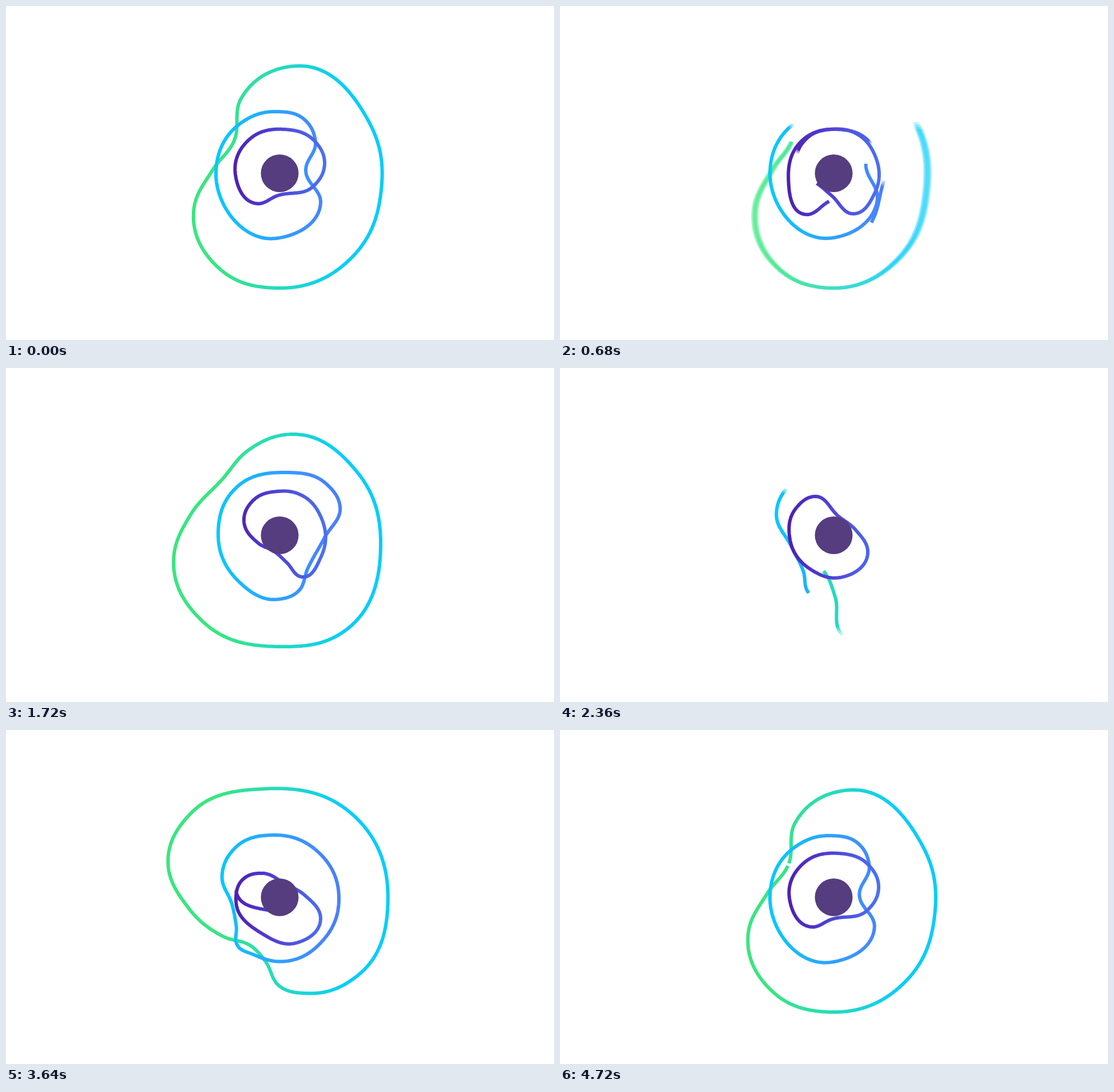
An HTML page with a canvas that plays this animation: 958 px wide and 585 px high, repeating every 4760 ms.

```html
<!DOCTYPE html>
<html lang="en">
<head>
<meta charset="utf-8">
<title>Morphing rings</title>
<style>
html, body { margin: 0; width: 100%; height: 100%; overflow: hidden; background: #fff; }
canvas { display: block; }
</style>
</head>
<body>
<canvas id="stage" width="958" height="585"></canvas>
<script>
const ctx = document.getElementById('stage').getContext('2d');
const LOOP = 4760, STEP = 40, N = 240;
const CX = 478.5, CY = 293;
const EXIT = 1840, GONE = 2090, UNIT = 640;

const clamp = v => Math.max(0, Math.min(1, v));
const mix = (a, b, u) => [a[0] + (b[0] - a[0]) * u, a[1] + (b[1] - a[1]) * u];
const dist = (a, b) => Math.hypot(b[0] - a[0], b[1] - a[1]);

function gradient(x0, x1, ...colors) {
  const g = ctx.createLinearGradient(x0, 0, x1, 0);
  colors.forEach((c, i) => g.addColorStop(i / (colors.length - 1), c));
  return g;
}

// Ring kinds from back to front; each starts drawing at `from` and needs `span`.
const kinds = [
  { name: 'outer', from: 482, span: 722, reach: 90, paint: gradient(370, 590, '#38e67f', '#25dabf', '#06cdfb') },
  { name: 'middle', from: 375, span: 605, reach: 70, paint: gradient(375, 570, '#06c8fd', '#30a2ff', '#4980fc') },
  { name: 'inner', from: 0, span: 520, reach: 50, paint: gradient(400, 557, '#4e20b4', '#5046d6', '#4b70f2') }
];

// A ring is a few nodes from its seam onward. Each pull [node, dx, dy] drags
// the outline around that node, once per UNIT of time; it is at rest at age `key`.
const sets = [
  { start: 3520, key: 1240, swell: 0.07,
    outer: { nodes: [[398, 238], [362, 286], [328, 360], [372, 459], [472, 494], [604, 441],
      [656, 322], [634, 202], [508, 105], [411, 162]], pulls: [] },
    middle: { nodes: [[524, 288], [550, 345], [472, 407], [367, 292], [415, 202], [472, 185],
      [523, 200], [541, 238]], pulls: [[0, 10, -11]] },
    inner: { nodes: [[475, 332], [438, 346], [401, 295], [425, 234], [486, 216], [540, 237],
      [557, 275], [537, 316]], pulls: [[1, -8, 18]] } },
  { start: 240, key: 1480, swell: 0.03,
    outer: { nodes: [[378, 195], [322, 258], [293, 337], [345, 445], [480, 488], [590, 462],
      [655, 310], [612, 180], [500, 116], [425, 143]], pulls: [] },
    middle: { nodes: [[528, 350], [557, 297], [584, 243], [560, 203], [488, 183], [402, 210],
      [371, 285], [405, 372], [477, 405], [510, 392]], pulls: [[0, -10, -18]] },
    inner: { nodes: [[470, 322], [490, 340], [518, 366], [551, 330], [551, 262], [515, 222],
      [476, 216], [432, 232], [416, 268], [440, 306]], pulls: [[0, 13, 7]] } },
  { start: 1805, key: 1195, swell: 0.02,
    outer: { nodes: [[445, 367], [467, 402], [486, 458], [530, 474], [615, 433], [664, 298],
      [600, 145], [452, 103], [325, 147], [287, 228], [320, 300], [390, 342]],
      pulls: [[0, -17, 0], [3, -3, -13], [11, 3, 20]] },
    middle: { nodes: [[420, 386], [414, 350], [400, 310], [378, 255], [400, 207], [467, 184],
      [545, 213], [582, 295], [555, 368], [490, 408], [445, 400]], pulls: [[0, -15, -8]] },
    inner: { nodes: [[488, 265], [520, 287], [544, 328], [498, 370], [445, 356], [402, 300],
      [414, 253], [447, 238]], pulls: [[7, 2, 13], [2, 4, 4], [3, 9, 2]] } }
];

function moveNodes({ nodes, pulls }, reach, k) {
  return nodes.map(p => pulls.reduce(([x, y], [i, dx, dy]) => {
    const w = k * Math.exp(-((dist(p, nodes[i]) / reach) ** 2));
    return [x + dx * w, y + dy * w];
  }, p));
}

const widen = (pts, s) => pts.map(([x, y]) => [CX + (x - CX) * s, y]);

// Unit tangent of the circle through a node and its two neighbours.
function tangent(a, b, c) {
  const l0 = dist(a, b), l1 = dist(b, c);
  const x = (b[0] - a[0]) * l1 / l0 + (c[0] - b[0]) * l0 / l1;
  const y = (b[1] - a[1]) * l1 / l0 + (c[1] - b[1]) * l0 / l1;
  const l = Math.hypot(x, y);
  return [x / l, y / l];
}

// Closed smooth curve through the nodes, as N even steps from the seam.
function curve(nodes) {
  const n = nodes.length, at = i => nodes[(i + n) % n];
  const dirs = nodes.map((p, i) => tangent(at(i - 1), p, at(i + 1)));
  const dense = [nodes[0]], len = [0];
  for (let i = 0; i < n; i++) {
    const a = at(i), d = at(i + 1), t0 = dirs[i], t1 = dirs[(i + 1) % n], h = dist(a, d) * 0.37;
    const b = [a[0] + t0[0] * h, a[1] + t0[1] * h], c = [d[0] - t1[0] * h, d[1] - t1[1] * h];
    for (let j = 1; j <= 20; j++) {
      const u = j / 20, m = mix(b, c, u);
      const p = mix(mix(mix(a, b, u), m, u), mix(m, mix(c, d, u), u), u);
      len.push(len[len.length - 1] + dist(dense[dense.length - 1], p));
      dense.push(p);
    }
  }
  const out = [], total = len[len.length - 1];
  for (let s = 0, k = 1; s <= N; s++) {
    const goal = total * s / N;
    while (k < len.length - 1 && len[k] < goal) k++;
    out.push(mix(dense[k - 1], dense[k], (goal - len[k - 1]) / (len[k] - len[k - 1])));
  }
  return out;
}

function line(pts, from, to) {
  ctx.beginPath();
  for (let k = from; k <= to; k++) ctx.lineTo(pts[k][0], pts[k][1]);
  if (to - from === N) ctx.closePath();
  ctx.stroke();
}

// Visible part of a ring, with a short fade at its moving tip.
function trace(pts, part, alpha) {
  const end = Math.round(part * N);
  if (end < 1) return;
  const tail = part < 0.97 ? Math.min(3, end - 1) : 0;
  ctx.globalAlpha = alpha;
  line(pts, 0, end - tail);
  for (let j = 0; j < tail; j++) {
    ctx.globalAlpha = alpha * (0.75 - j * 0.25);
    line(pts, end - tail + j, end - tail + j + 1);
  }
}

function drawRing(set, kind, age) {
  const erased = clamp((age - EXIT) / (GONE - EXIT));
  const part = Math.min(clamp((age - kind.from) / kind.span), 1 - erased);
  if (part <= 0) return;
  const k = (age - set.key) / UNIT;
  const outer = kind.name === 'outer';
  let nodes = moveNodes(set[kind.name], kind.reach, k);
  if (outer) nodes = widen(nodes, 1 + set.swell * k - 0.5 * erased);
  const pts = curve(nodes);
  ctx.strokeStyle = kind.paint;
  if (outer && erased) {
    // Motion blur while the outer ring snaps inward.
    for (let j = -2; j <= 2; j++) trace(widen(pts, 1 + j * 0.013), part, 0.35);
  } else {
    trace(pts, part, 1);
  }
}

function render(t) {
  ctx.globalAlpha = 1;
  ctx.fillStyle = '#fff';
  ctx.fillRect(0, 0, 958, 585);
  ctx.lineWidth = 6;
  ctx.lineJoin = 'round';
  for (const kind of kinds) {
    for (const set of sets) drawRing(set, kind, (t - set.start + LOOP) % LOOP);
  }
  ctx.globalAlpha = 1;
  ctx.fillStyle = '#553d80';
  ctx.beginPath();
  ctx.arc(CX, CY, 33, 0, Math.PI * 2);
  ctx.fill();
}

const begin = performance.now();
function tick() {
  const t = (performance.now() - begin) % LOOP;
  render(Math.floor(t / STEP) * STEP);
  requestAnimationFrame(tick);
}
tick();
</script>
</body>
</html>
```
